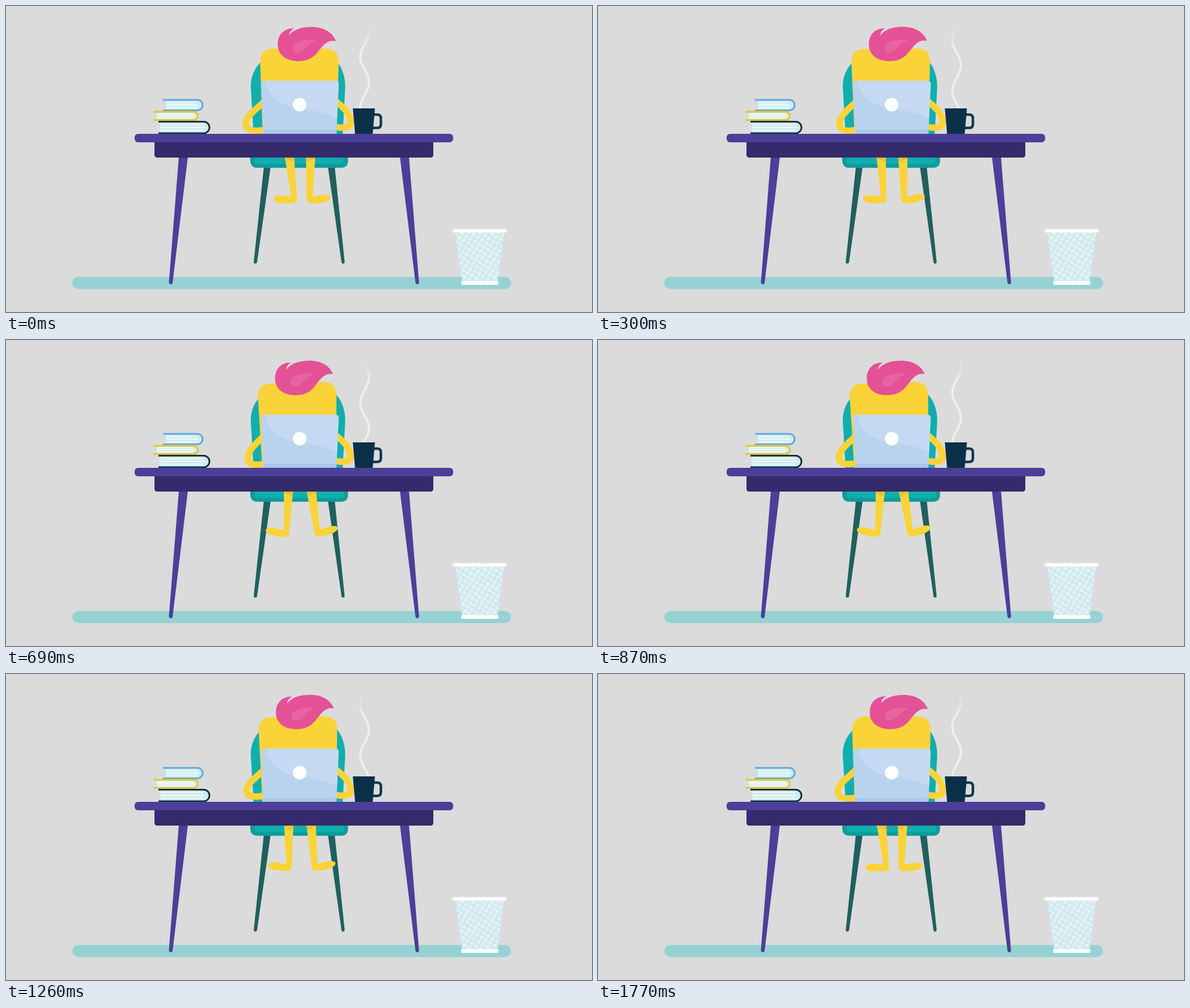
These frames come from a looping animation (1034 by 541 pixels, 1800 ms). An HTML page:

```html
<!DOCTYPE html>
<html lang="en">
<head>
<meta charset="utf-8">
<title>Working at the desk</title>
<style>
  html, body { margin: 0; width: 100%; height: 100%; overflow: hidden; background: #dbdbdb; }
  svg { display: block; width: 100%; height: 100%; }
  .purple { fill: #4b3f99; }
  .teal { fill: #11aeae; }
  .yellow { fill: #fad338; }
  .shade { fill: #f3c12d; }
  .arm { fill: none; stroke: #fad338; stroke-width: 11.5; }
  .pages { fill: #d0ebee; }
  .cover { fill: none; stroke-width: 3; }
  .lines { stroke: #fff; stroke-width: 1.3; }
</style>
</head>
<body>
<svg viewBox="0 0 1034 541">
  <defs>
    <linearGradient id="fade" gradientUnits="userSpaceOnUse" x1="0" y1="34" x2="0" y2="78">
      <stop offset="0" stop-color="#efefef" stop-opacity="0"/>
      <stop offset="1" stop-color="#efefef"/>
    </linearGradient>
    <pattern id="mesh" width="9" height="9" patternUnits="userSpaceOnUse" patternTransform="rotate(32)">
      <rect width="9" height="9" fill="#cde8ed"/>
      <rect x="1.3" y="1.3" width="6.4" height="6.4" rx="1.5" fill="#e2f3f6"/>
    </pattern>
  </defs>

  <rect x="117" y="479" width="774" height="21.5" rx="10.7" fill="#96d2d3"/>

  <g id="bin">
    <path d="M793 399H879L867 488H805Z" fill="url(#mesh)"/>
    <rect x="788" y="394.5" width="95.5" height="6" rx="2" fill="#fff"/>
    <rect x="803" y="486.5" width="66" height="6.5" rx="2.5" fill="#fff"/>
  </g>

  <g id="chair">
    <path class="teal" d="M437 230L432 144C431 126 439 108 452 97H583C593 108 599 126 598.500 144L594 230Z"/>
    <g fill="#1f605f">
      <path d="M455 284H467L443 453Q442 456 439.500 455.500Q437 455 437.200 452Z"/>
      <path d="M568 284H580L597.500 452Q597.500 455.500 595 455.500Q592.500 456 592 453Z"/>
    </g>
    <path d="M431 262H603.500V274Q603 286 591 286H444Q431.500 286 431 274Z" fill="#0d9c9c"/>
    <path class="teal" d="M439 262H596V279H443Q439 279 439 275Z"/>
  </g>

  <g id="leftLeg">
    <path class="yellow" d="M490 255H507.500L513.500 340Q514 347.500 507 348Q497 349.500 487 349C477 348.500 471.500 345.500 472 341C473 336 482 334 503.500 337Z"/>
    <path class="shade" d="M490.500 262H508L508.600 275Q500 274 491 269Z"/>
  </g>
  <g id="rightLeg">
    <path class="yellow" d="M529 255H546.500L541 337C557 333 571 333 572.500 338C573 343 566 346.500 556 348Q546 349.500 537 348.500Q530.500 348 530.500 341Z"/>
    <path class="shade" d="M529.200 262H546L545.500 269Q538 274 529.500 275Z"/>
  </g>

  <g id="body">
    <path class="yellow" d="M471 75.500H564C580 75.500 587.500 84 587 100L583 230H453L448.500 100C448 84 456 75.500 471 75.500Z"/>
    <path fill="#e55196" d="M582 62C568 59 561 68 552 79C543 91 533 97.500 516 97.500C494 97.500 479.500 86 479.500 68C479.500 50 491 39 508.500 39.500Q500 44 499.500 52C508 41 522 37 539 37C560 37 576 46 582 62Z"/>
    <path fill="#e9649f" d="M548.500 61.500C536 64 531 74 522 80C514 85 506.500 82 506.500 74C507 64 528 56.500 548.500 61.500Z"/>
  </g>

  <path id="leftArm" class="arm"/>
  <path class="arm" d="M578 166C594 177 608 191 608 205C608 216 595 217 578 213"/>

  <g id="laptop">
    <path fill="#b9d3ee" d="M456 132H581Q587.500 132 587 139L583 226H454L450 139Q449.500 132 456 132Z"/>
    <path fill="#c6d9f2" d="M458 132H581Q587.500 132 587 139L584 199C566 189 548 185 526 183C490 179 463 164 458 132Z"/>
    <path fill="#aac8e9" d="M453.700 219H583.300L583 226H454Z"/>
    <circle cx="518" cy="174.500" r="12" fill="#fff"/>
  </g>

  <path id="steam" fill="none" stroke="url(#fade)" stroke-width="4"/>
  <g id="mug">
    <path d="M648 192H655Q661.500 192 661.500 198.500V209Q661.500 215.500 655 215.500H646" fill="none" stroke="#0d3852" stroke-width="4.500"/>
    <path d="M612 181H651L647 227H616Z" fill="#0b3049"/>
  </g>

  <g id="books"></g>

  <g id="desk">
    <path class="purple" d="M305 266H321L294 489Q293.500 492 290.500 492Q287.300 491.500 287.500 488Z"/>
    <path class="purple" d="M695 266H711L728.700 488Q729 491.500 726 492Q723 492 722.500 489Z"/>
    <path fill="#352a6b" d="M262 238H754V263Q754 268 749 268H267Q262 268 262 263Z"/>
    <rect class="purple" x="227" y="226" width="562" height="15" rx="6"/>
  </g>
</svg>
<script>
const LOOP = 1800, STEP = 30, TAU = Math.PI * 2;
const el = id => document.getElementById(id);

// Outer box of each book, its cover colour and the inset of its pages.
function book(left, top, right, bottom, color, inset) {
  const y1 = top + 1.5, y2 = bottom - 1.5, r = (y2 - y1) / 2, bend = right - 1.5 - r;
  const shape = x => `M${x} ${y1}H${bend}A${r} ${r} 0 0 1 ${bend} ${y2}H${x}`;
  const lines = [-1, 0, 1].map(i =>
    `M${left + inset + 2} ${y1 + r + i * r * 0.48}H${bend - 1 + (i ? 0 : 3)}`).join('');
  return `<path class="pages" d="${shape(left + inset)}Z"/><path class="lines" d="${lines}"/>` +
    `<path class="cover" stroke="${color}" d="${shape(left)}"/>`;
}
el('books').innerHTML =
  book(277, 164.5, 348.5, 186, '#5faadd', 4) +
  book(260, 185.5, 340, 203, '#e8c522', 5) +
  book(269, 203, 360.5, 226.5, '#0b3049', 2);

// time, elbow shift, hand lift
const ARM = [
  [0, 0, 0], [300, 3, 0], [690, 4, 0], [1080, 0, 3],
  [1260, 1.5, 4], [1560, 4, 5], [1770, 0.5, 0.5], [1800, 0, 0]
];

function armPose(t) {
  const i = ARM.findIndex(k => k[0] > t);
  const a = ARM[i - 1], b = ARM[i];
  const u = (1 - Math.cos(Math.PI * (t - a[0]) / (b[0] - a[0]))) / 2;
  return [1, 2].map(n => a[n] + (b[n] - a[n]) * u);
}

function steamPath(t) {
  let d = '';
  for (let y = 34; y <= 184; y += 3) {
    const x = 632.8 - 7.7 * Math.cos(TAU * (y + t / 10) / 90);
    d += `${d ? 'L' : 'M'}${x.toFixed(2)} ${y}`;
  }
  return d;
}

const turn = (id, angle, x, y) =>
  el(id).setAttribute('transform', `rotate(${angle} ${x} ${y})`);

function draw(t) {
  const sway = (1 - Math.cos(TAU * (t + 25) / LOOP)) / 2;
  turn('body', -1.65 * sway, 517, 250);
  turn('leftLeg', 10.4 * sway, 500, 256);
  turn('rightLeg', -10.4 * sway, 538, 258);

  const [shift, lift] = armPose(t);
  const x = 422.8 + shift, y = 208 - lift / 2;
  el('leftArm').setAttribute('d',
    `M458 167C443 181 ${x} 195 ${x} ${y}C${x + 1} ${222 - lift} 440 ${222 - lift} 458 ${219 - lift}`);
  el('steam').setAttribute('d', steamPath(t));
}

const start = performance.now();
function tick() {
  const t = (performance.now() - start) % LOOP;
  draw(Math.floor(t / STEP) * STEP);
  requestAnimationFrame(tick);
}
tick();
</script>
</body>
</html>
```
